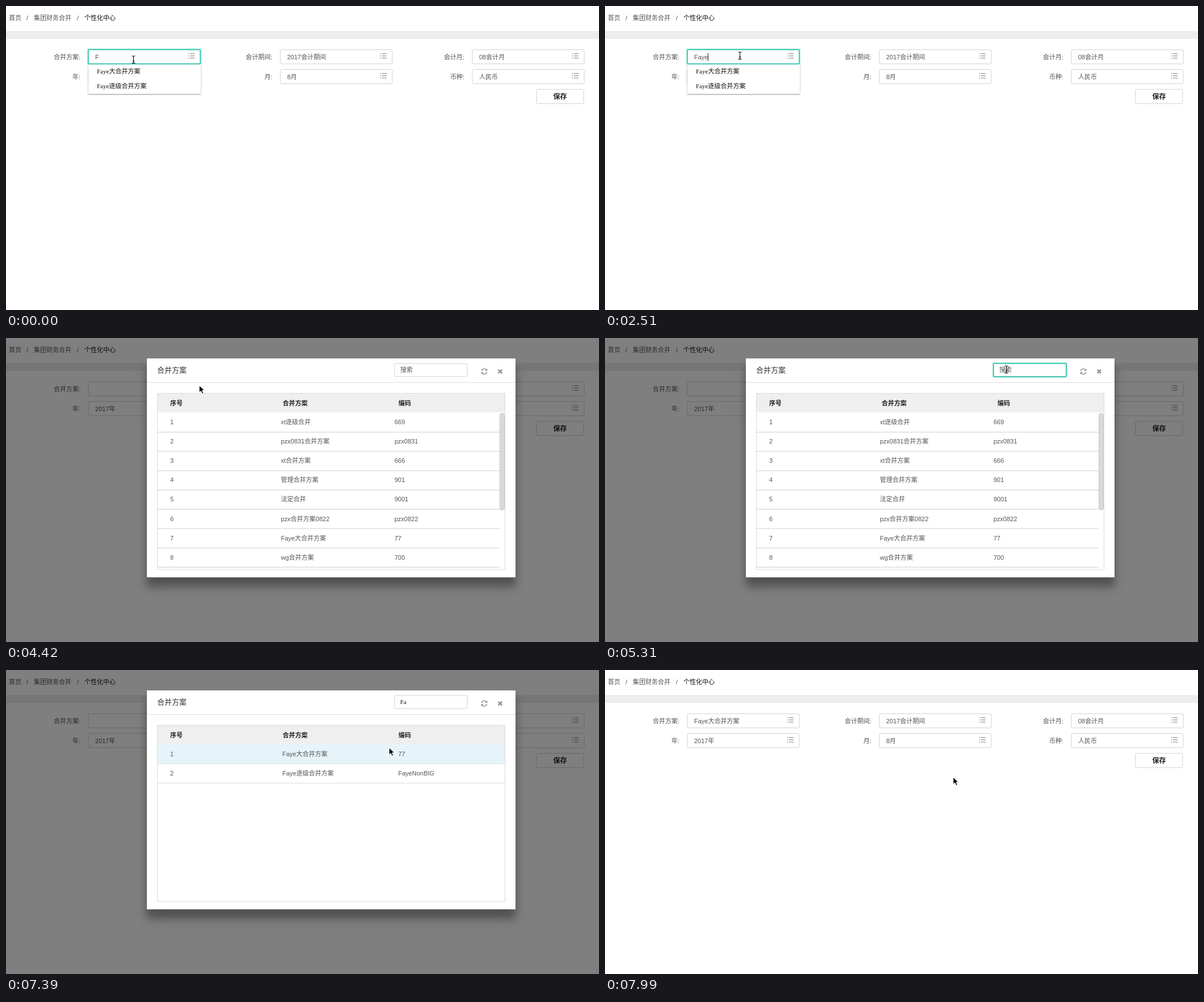
An HTML page for the animation above (8.14 s loop, 1044 by 536 pixels).

```html
<!DOCTYPE html>
<html lang="zh-CN">
<head>
<meta charset="utf-8">
<title>个性化中心</title>
<style>
* { box-sizing: border-box; }
html, body { margin: 0; width: 100%; height: 100%; overflow: hidden; background: #fff; }
body { position: relative; font: 11px/20px "Liberation Sans", "Noto Sans CJK SC", "Noto Sans CJK", sans-serif; color: #555; }
div, span, svg { position: absolute; white-space: pre; }
svg { overflow: visible; }
.serif { font-family: "Liberation Serif", "Noto Sans CJK SC", "Noto Sans CJK", serif; color: #111; }
.bold { font-weight: bold; color: #222; }
.dark { color: #111; }
.right { transform: translateX(-100%); }
.title { font-size: 13px; color: #333; }
.save { font-size: 12px; }
.box { fill: #fff; stroke: #d0d0d0; }
.hover { stroke: #1aab90; }
.focus { stroke: #1dbda5; stroke-width: 1.5; }
.glow { fill: none; stroke: #1dbda5; stroke-width: 5; opacity: .28; }
.caret { display: inline-block; width: 1px; height: 14px; vertical-align: -3px; background: #222; }
.list { background: #fff; box-shadow: 0 1px 2px rgba(0,0,0,.45); }
.shade { background: rgba(0,0,0,.5); }
.modal { background: #fff; box-shadow: 0 18px 20px rgba(0,0,0,.2), 0 15px 12px rgba(0,0,0,.22); }
.table { border: 1px solid #dadada; }
.thumb { border-radius: 5px; background: #d9d9d9; border: 1px solid #c8c8c8; }
#cursor { left: 0; top: 0; width: 1px; height: 1px; }
</style>
</head>
<body>
<div id="page"></div>
<div id="live"></div>
<svg id="cursor">
  <path id="beam" d="M-2.5-6.5Q0-6.5 0-4.5Q0-6.5 2.5-6.5M0-4.5V4.5M-2.5 6.5Q0 6.5 0 4.5Q0 6.5 2.5 6.5M-1.5 2.5H1.5" fill="none" stroke="#111" stroke-width="1.1" stroke-linecap="square"/>
  <path id="arrow" d="M0 0V12.5L3 9.8L5.1 14.6L7.4 13.6L5.3 8.9H9.2Z" fill="#000" stroke="#fff"/>
  <path id="hand" d="M0 1Q1.3-1 2.6 1L3.8 5Q5 3.9 6 5Q7.2 4.2 8.1 5.5Q9.5 5 9.8 6.7L10.2 10.4L9.2 15H3L-1 10.6Q-3.2 8-1.6 7.6Q.2 7.6 1.7 9.2Z" fill="#fff" stroke="#111" stroke-linejoin="round"/>
</svg>
<script>
const LOOP = 8140, FRAME = 147.8;
const PLAN = 'Faye大合并方案';
const MATCHES = [[PLAN, '77'], ['Faye逐级合并方案', 'FayeNonBIG']];
const PLANS = [['xt逐级合并', '669'], ['pzx0831合并方案', 'pzx0831'], ['xt合并方案', '666'],
  ['管理合并方案', '901'], ['法定合并', '9001'], ['pzx合并方案0822', 'pzx0822'], MATCHES[0], ['wg合并方案', '700']];
const DELETIONS = [1930, 2070, 2220, 2360, 2510, 2660, 2960, 3100, 3400];

// time, x, y, shape used from this moment on
const PATH = [
  [0, 224.5, 94.5, 'beam'], [150, 224.5, 94.5, 'beam'], [300, 218, 104, 'arrow'], [600, 205, 114, 'arrow'],
  [890, 205, 114, 'arrow'], [1040, 222, 100, 'beam'], [1340, 237.5, 87.5, 'beam'], [3700, 237.5, 87.5, 'beam'],
  [4120, 333.5, 86, 'hand'], [4290, 333.5, 86, 'hand'], [4420, 334, 84, 'arrow'], [4570, 400, 80, 'arrow'],
  [4860, 692, 60, 'beam'], [5300, 706.5, 55.5, 'beam'], [6350, 706.5, 55.5, 'beam'], [6640, 700, 80, 'arrow'],
  [7090, 674.5, 137, 'arrow'], [7690, 674.5, 137, 'arrow'], [7970, 613, 189, 'arrow']
];

const $ = id => document.getElementById(id);
const within = (t, from, to) => t >= from && t < to;
const text = (x, cy, s, cls = '') => `<span class="${cls}" style="left:${x}px;top:${cy - 10}px">${s}</span>`;
const rect = (x, y, w, h, cls = '', fill = '') =>
  `<div class="${cls}" style="left:${x}px;top:${y}px;width:${w}px;height:${h}px;${fill && 'background:' + fill}"></div>`;
const svg = (x, y, body) => `<svg width="1" height="1" style="left:${x}px;top:${y}px">${body}</svg>`;
const listIcon = (x, y) => svg(x, y, '<path d="M-6-4h2m1.5 0h8M-6 0h2m1.5 0h8M-6 4h2m1.5 0h8" transform="translate(.5 0)" stroke="#777" stroke-width="1.1"/>');

// x, y, w and h describe the centre line of the border
function box(x, y, w, h, cls = '') {
  const shape = name => `<rect x="${x}" y="${y}" width="${w}" height="${h}" rx="1.5" class="${name}"/>`;
  return svg(0, 0, (cls === 'focus' ? shape('glow') : '') + shape('box ' + cls));
}

function field(x, y, value, cls) {
  return box(x, y, 197, 25, cls) + text(x + 12, y + 12.5, value) + listIcon(x + 181, y + 11);
}

function buildPage() {
  const crumbs = text(5, 21, '首页') + text(36, 21, '/') + text(49, 21, '集团财务合并') +
    text(125, 21, '/') + text(138, 21, '个性化中心', 'dark');
  const rows = [['合并方案', '', '会计期间', '2017会计期间', '会计月', '08会计月'],
    ['年', '2017年', '月', '8月', '币种', '人民币']];
  const form = rows.map((row, r) => [0, 1, 2].map(c => {
    const x = 145 + 338 * c, y = 77 + 35 * r;
    const label = text(x - 14, y + 12.5, row[2 * c] + ':', 'right');
    return label + (r + c ? field(x, y, row[2 * c + 1]) : '');
  }).join('')).join('');
  return crumbs + rect(0, 44, 1044, 14, '', '#ededed') + form +
    box(934, 147, 83, 25) + text(963.5, 159.5, '保存', 'bold save');
}

function planField(t) {
  const typed = PLAN.slice(0, PLAN.length - DELETIONS.filter(d => t >= d).length);
  const value = t < 890 ? PLAN[0] : t >= 7540 ? PLAN : typed;
  const cls = t < 890 || within(t, 1340, 4130) ? 'focus' : within(t, 4130, 4420) ? 'hover' : '';
  const caret = within(t, 1480, 4130) ? '<i class="caret"></i>' : '';
  return field(145, 77, value + caret, cls);
}

function dropdown(t) {
  const items = t < 890 || within(t, 1480, 1930) || within(t, 2510, 3540) ? MATCHES
    : within(t, 1930, 2510) ? [MATCHES[0]]
    : within(t, 3540, 4420) ? PLANS : [];
  if (!items.length) return '';
  const pitch = 25.85;
  const bar = items === PLANS
    ? rect(333, 103, 9, 206, '', '#f1f1f1') + rect(333, 103, 9.5, 127, 'thumb') : '';
  return rect(145, 103, 197.5, pitch * items.length, 'list') + bar +
    items.map(([name], i) => text(160, 115.2 + pitch * i, name, 'serif')).join('');
}

function modal(t, pointerY) {
  const filtered = t >= 5760;
  const rows = filtered ? MATCHES : PLANS;
  const query = t < 5760 ? '搜索' : t < 6210 ? 'F' : 'Fa';
  const [nameX, codeX, lineEnd] = filtered ? [486.5, 690.5, 878] : [484, 684, 869];
  const pitch = 34.1;
  const header = rect(247.5, 36, 649.5, 386, 'modal') + rect(247.5, 78, 649.5, 1, '', '#dedede') +
    text(266, 57, '合并方案', 'serif title') +
    box(684, 45, 128, 23, within(t, 5010, 7240) ? 'focus' : '') +
    text(694, 56, query, filtered ? 'serif' : '') +
    svg(842, 58.5, '<g fill="none" stroke="#999" stroke-width="1.6"><path d="M-4.6-1A4.7 4.7 0 0 1 3.5-3.2M4.6 1A4.7 4.7 0 0 1-3.5 3.2"/></g><path d="M5.4-5.4V-1H1ZM-5.4 5.4V1H-1Z" fill="#999"/>') +
    svg(870, 59, '<path d="M-3.2-3.2L3.2 3.2M3.2-3.2L-3.2 3.2" stroke="#999" stroke-width="2.7"/>');
  const heads = rect(267, 98, 611, 33, '', '#efefef') + text(289, 114.5, '序号', 'bold') +
    text(487, 114.5, '合并方案', 'bold') + text(691, 114.5, '编码', 'bold');
  const hover = filtered && within(pointerY, 131, 165) ? rect(267, 131, 611, 34, '', '#e6f4fa') : '';
  const body = rows.map(([name, code], i) => {
    const cy = 148 + pitch * i;
    return text(289, cy, i + 1) + text(nameX, cy, name) + text(codeX, cy, code) +
      rect(267, Math.round(cy + 16.6), lineEnd - 267, filtered ? 1 : 2, '', filtered ? '#dedede' : '#e6e6e6');
  }).join('');
  const bar = filtered ? '' : rect(868.5, 131.5, 9.5, 172.5, 'thumb');
  return rect(0, 0, 1044, 536, 'shade') + header + heads + hover + body + bar + rect(266, 97, 613, 312, 'table');
}

function pointer(t) {
  const time = Math.floor((t + 14) / FRAME) * FRAME;
  const i = PATH.findLastIndex(key => key[0] <= time);
  const [t0, x0, y0, shape] = PATH[i];
  const [t1, x1, y1] = PATH[i + 1] || [LOOP, x0, y0];
  const k = (time - t0) / (t1 - t0);
  return { x: x0 + (x1 - x0) * k, y: y0 + (y1 - y0) * k, shape };
}

let shown = '';
function render(now) {
  const t = now % LOOP;
  const { x, y, shape } = pointer(t);
  const html = planField(t) + dropdown(t) + (within(t, 4420, 7540) ? modal(t, y) : '');
  if (html !== shown) $('live').innerHTML = shown = html;
  for (const name of ['beam', 'arrow', 'hand']) $(name).style.display = name === shape ? '' : 'none';
  $('cursor').style.transform = `translate(${x}px,${y}px)`;
  requestAnimationFrame(render);
}

$('page').innerHTML = buildPage();
render(0);
</script>
</body>
</html>
```
